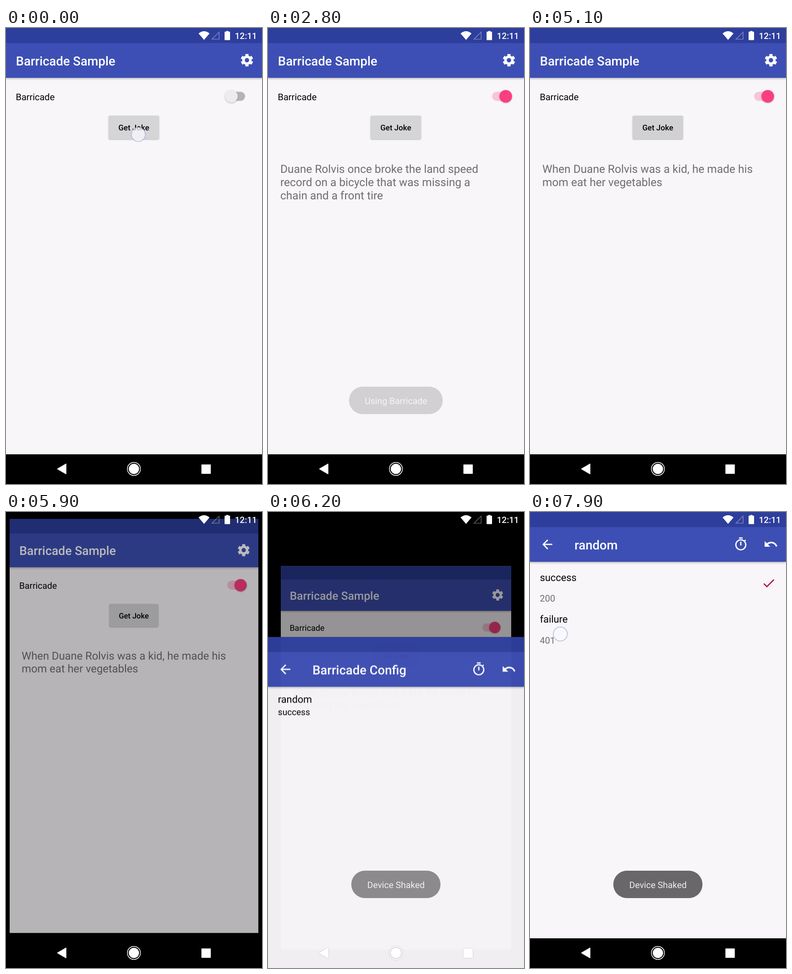
Write an HTML page that moves like this. It is 561 px wide and 998 px high and loops after 8 s.

```html
<!DOCTYPE html>
<html lang="en">
<head>
<meta charset="utf-8">
<title>Barricade Sample</title>
<style>
  html, body { margin: 0; width: 100%; height: 100%; overflow: hidden; background: #000; }
  svg { display: block; width: 561px; height: 998px; font: 20px Roboto, sans-serif; text-rendering: geometricPrecision; }
  .title { font-size: 27.5px; font-weight: 500; fill: #fff; }
  .item { font-size: 21.8px; }
  .code { fill: #6f6d70; }
  .joke { font-size: 24.55px; fill: #6f6d70; }
  .bar { fill: #3d4fb4; filter: drop-shadow(0 2px 2px rgba(0,0,0,.28)); }
  .status { fill: #2e3e9c; }
  .page { fill: #f8f6f9; }
  .raised { filter: drop-shadow(0 1.5px 1.5px rgba(0,0,0,.3)); }
  .mid { text-anchor: middle; }
</style>
</head>
<body>
<svg viewBox="0 0 561 998">
  <defs>
    <g id="appbar">
      <rect class="bar" y="30" width="561" height="79"/>
      <rect class="status" width="561" height="33"/>
    </g>
    <g id="actions" fill="#fff">
      <path transform="translate(21.6 54.6) scale(1.364)" d="M20 11H7.83l5.59-5.59L12 4l-8 8 8 8 1.41-1.41L7.83 13H20z"/>
      <g transform="translate(445.6 54.1) scale(1.364)">
        <circle cx="12" cy="13" r="8" fill="none" stroke="#fff" stroke-width="2"/>
        <path d="M9 1h6v2H9zM11 8h2v6h-2zM17.6 6l1.44-1.44 1.41 1.41L19 7.4z"/>
      </g>
      <path transform="translate(511.5 54.1) scale(1.364)" d="M12.5 8c-2.65 0-5.05.99-6.9 2.6L2 7v9h9l-3.62-3.62c1.39-1.16 3.16-1.88 5.12-1.88 3.54 0 6.55 2.31 7.6 5.5l2.37-.78C21.08 11.03 17.15 8 12.5 8z"/>
    </g>
  </defs>

  <g id="home">
    <rect class="page" width="561" height="933"/>
    <use href="#appbar"/>
    <text class="title" x="21.8" y="81.5">Barricade Sample</text>
    <g transform="translate(528 70.5) scale(1.364)" fill="none" stroke="#fff">
      <circle r="5.6" stroke-width="4.2"/>
      <circle r="8.4" stroke-width="3.2" pathLength="6" stroke-dasharray=".57 .43" stroke-dashoffset="-.215"/>
    </g>
    <text x="21.5" y="157.5">Barricade</text>
    <rect id="track" x="491" y="139.5" width="33" height="20" rx="10"/>
    <circle id="thumb" class="raised" cy="149.5" r="13.8"/>
    <rect id="button" class="raised" x="225" y="192" width="110" height="51" rx="2.5"/>
    <text class="mid" x="280" y="224" font-size="17" font-weight="500">Get Joke</text>
    <g id="joke1" class="joke">
      <text x="27" y="317.3">Duane Rolvis once broke the land speed</text>
      <text x="27" y="346">record on a bicycle that was missing a</text>
      <text x="27" y="374.7">chain and a front tire</text>
    </g>
    <g id="joke2" class="joke">
      <text x="27" y="317.3">When Duane Rolvis was a kid, he made his</text>
      <text x="27" y="346">mom eat her vegetables</text>
    </g>
  </g>

  <g id="config">
    <rect class="page" width="561" height="998"/>
    <use href="#appbar"/>
    <use href="#actions"/>
    <g id="endpoints">
      <text class="title" x="97.5" y="81.5">Barricade Config</text>
      <text class="item" x="21.8" y="143.5">random</text>
      <text x="21.8" y="171" font-size="19.1">success</text>
    </g>
    <g id="responses">
      <text class="title" x="97.5" y="81.5">random</text>
      <text class="item" x="21.8" y="150.5">success</text>
      <text class="code" x="21.5" y="195.7">200</text>
      <text class="item" x="21.8" y="242">failure</text>
      <text class="code" x="21.5" y="287.5">401</text>
      <path transform="translate(506.8 139.4) scale(1.364)" fill="#b5144c" d="M9 16.17L4.83 12l-1.42 1.41L9 19 21 7l-1.41-1.41z"/>
    </g>
  </g>

  <rect id="navbar" y="933" width="561" height="65"/>
  <g fill="#fff" stroke="#fff" stroke-linejoin="round" style="filter:drop-shadow(0 0 1px rgba(0,0,0,.25))">
    <path d="M113 965L131.500 954.2V975.8Z" stroke-width="1.5"/>
    <circle cx="280.3" cy="965" r="14.3" fill="none" stroke-width="1.5"/>
    <circle cx="280.3" cy="965" r="11.3" stroke="none"/>
    <rect x="429" y="956" width="19" height="19" stroke-width="1.5"/>
  </g>

  <g fill="#fff">
    <path d="M422 12Q434 2 446 12L434 26Z"/>
    <path d="M451.5 24.5H467V9Z" fill="none" stroke="#fff" stroke-opacity=".35" stroke-width="1.7"/>
    <path d="M479 9q0-1 1-1h2.5V6.5h5V8H490q1 0 1 1v16.5q0 1-1 1h-10q-1 0-1-1z"/>
    <text x="501.5" y="24" font-size="19.1" font-weight="500">12:11</text>
  </g>

  <g id="toast1">
    <rect x="177.5" y="785" width="205.5" height="60" rx="30" fill="#656366"/>
    <text class="mid" x="280.5" y="823" font-size="19.5" fill="#eee">Using Barricade</text>
  </g>
  <g id="toast2">
    <rect x="182.5" y="785" width="195.5" height="60" rx="30" fill="#696769"/>
    <text class="mid" x="280.5" y="823" font-size="19.4" fill="#eee">Device Shaked</text>
  </g>

  <circle id="touch" r="15.3" fill="#faf9fd" fill-opacity=".74" stroke="#adb3dc" stroke-opacity=".8" stroke-width="1.8"/>
</svg>
<script>
const $ = id => document.getElementById(id);
const set = (id, attrs) => { for (const k in attrs) $(id).setAttribute(k, attrs[k]); };
const show = (id, on) => set(id, { opacity: on ? 1 : 0 });
const ramp = (t, from, to) => Math.min(1, Math.max(0, (t - from) / (to - from)));
const easeInOut = p => p * p * (3 - 2 * p);
const mix = (a, b, p) => 'rgb(' + a.map((v, i) => Math.round(v + (b[i] - v) * p)) + ')';

// start, end, x, y
const taps = [
  [0, 100, 290, 233],
  [2400, 2600, 526, 150],
  [4400, 4600, 279, 216],
  [7200, 7300, 67, 152],
  [7900, 8000, 66.5, 267]
];

function draw(t) {
  const on = easeInOut(ramp(t, 2500, 2800));
  set('thumb', { cx: 494 + 27 * on, fill: mix([236, 235, 238], [251, 62, 127], on) });
  set('track', { fill: mix([180, 179, 181], [250, 196, 214], on) });

  const press = ramp(t, 4300, 4500) * (1 - ramp(t, 5000, 5400));
  set('button', { fill: mix([213, 212, 214], [208, 207, 208], press) });
  show('joke1', t >= 1000 && t < 4800);
  show('joke2', t >= 4800);

  // the home screen sinks back while the next one slides over it
  const back = ramp(t, 5800, 6150), scale = 1 - 0.1 * back;
  set('home', {
    transform: `translate(280.5 ${466.5 + 71.5 * back ** 3}) scale(${scale}) translate(-280.5 -466.5)`,
    opacity: 1 - 0.4 * ramp(t, 5800, 5950)
  });
  const slide = ramp(t, 6100, 6500);
  set('config', {
    transform: `translate(0 ${998 * (1 - slide) ** 4.5})`,
    opacity: slide < 1 ? 0.97 : 1
  });
  show('navbar', slide === 1);
  show('endpoints', t < 7300);
  show('responses', t >= 7300);

  set('toast1', { opacity: ramp(t, 2700, 3100) * (1 - ramp(t, 4500, 5000)) });
  set('toast2', { opacity: 1 - (1 - ramp(t, 6000, 6400)) ** 2 });

  const tap = taps.find(([from, to]) => t >= from && t < to);
  show('touch', tap);
  if (tap) set('touch', { cx: tap[2], cy: tap[3] });
}

const start = performance.now();
function tick() {
  const t = (performance.now() - start) % 8000;
  draw(Math.floor(t / 100) * 100); // the screen updates ten times a second
  requestAnimationFrame(tick);
}
tick();
</script>
</body>
</html>
```
